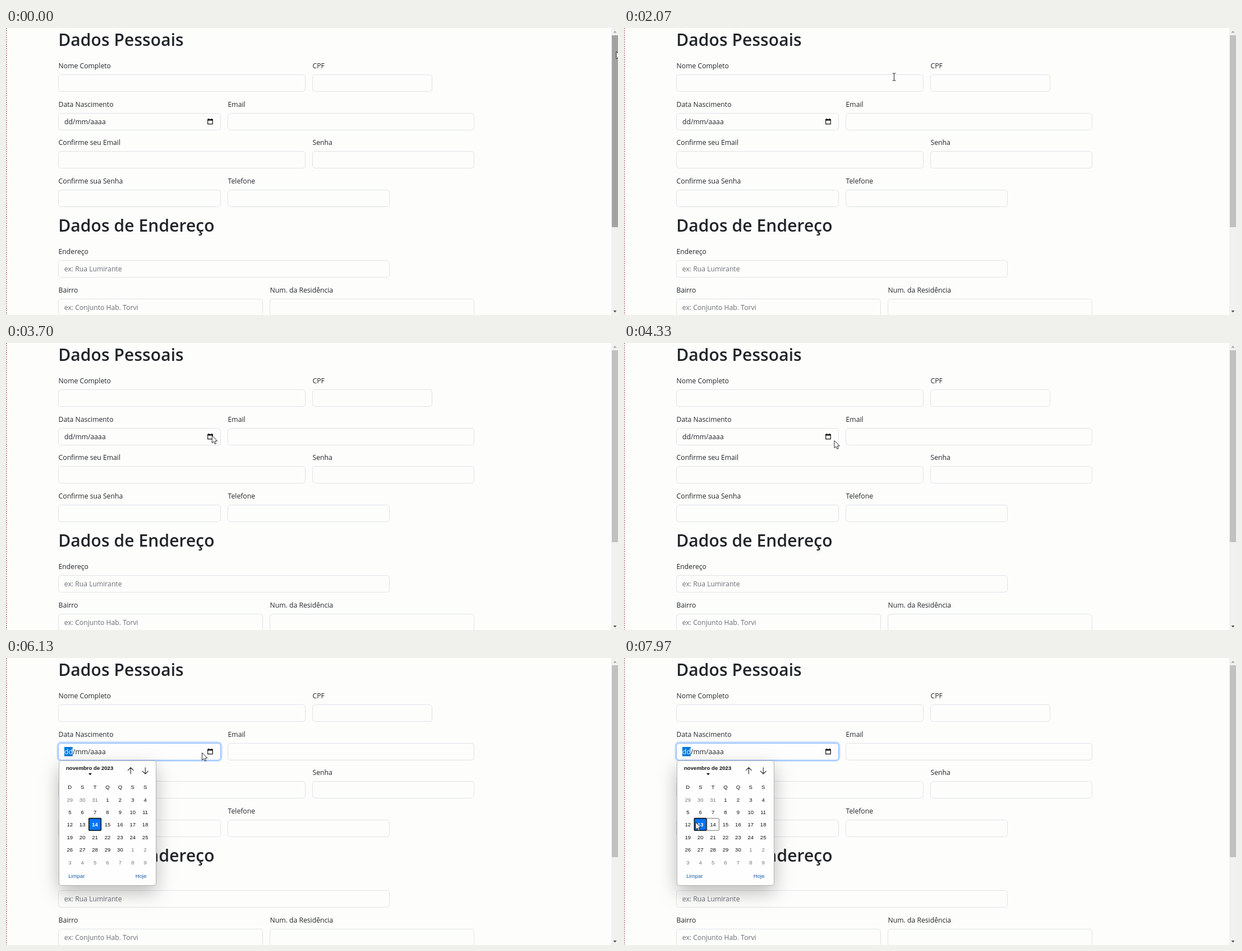
An HTML page for the animation above (8 s loop, 1091x513 px).

```html
<!DOCTYPE html>
<html lang="pt-BR">
<head>
<meta charset="utf-8">
<title>Cadastro</title>
<style>
  html, body { margin: 0; width: 100%; height: 100%; overflow: hidden; background: #fdfdfc; }
  svg { display: block; cursor: default; }
  text { font: 12.2px "Open Sans", "Noto Sans", sans-serif; fill: #212529; white-space: pre; }
  .title { font-size: 30px; font-weight: 600; letter-spacing: .08px; }
  .hint { fill: #6a6f74; }
  .box { fill: #fdfdfc; stroke: #dee2e6; }
  #popup text { font: 9.6px "Liberation Sans", Arial, sans-serif; fill: #111; }
  #popup .mid { text-anchor: middle; }
  #popup .bold { font-weight: bold; }
  #popup .out { fill: #767676; }
  #popup .link { fill: #1a5fa8; }
  #popup .on { fill: #fff; font-weight: bold; }
  #panel { fill: #fefefe; stroke: #b4b4b4; filter: drop-shadow(0 12px 16px rgba(0, 0, 0, .26)); }
</style>
</head>
<body>
<svg id="stage" width="1091" height="513" viewBox="0 0 1091 513">
  <path d="M.9 0V513" stroke="#a05054" stroke-width="1.2" stroke-dasharray="2 2"/>
  <g id="form"></g>
  <g id="focus">
    <rect x="92" y="150.7" width="292" height="33" rx="6.5" fill="none" stroke="#c2dbfe" stroke-width="3"/>
    <rect x="93.5" y="152.5" width="289" height="30" rx="5" fill="#fefefe" stroke="#86b7fe"/>
    <rect x="104" y="159" width="14.8" height="16.5" fill="#0078d7"/>
  </g>
  <text x="104" y="172"><tspan id="day">dd</tspan>/mm/aaaa</text>
  <path d="M359.7 163.4H368.3V171.6H359.7Z" fill="none" stroke="#111" stroke-width="1.2"/>
  <path d="M359.2 163H368.8V165.4H359.2ZM360.8 161.8h1.2v1.5h-1.2zM366 161.8h1.2v1.5h-1.2z" fill="#111"/>
  <rect x="1079" width="12" height="513" fill="#f1f1f1"/>
  <rect id="thumb" x="1080" y="13" width="11" height="343"/>
  <path d="M1082.5 8.5h6l-3 -3.4z" fill="#a3a3a3"/>
  <path d="M1082.5 505h6l-3 3.4z" fill="#505050"/>
  <g id="popup">
    <rect id="panel" x="94.5" y="183.5" width="173" height="223" rx="4.5"/>
    <text class="bold" x="107" y="200">novembro de 2023</text>
    <path d="M147 206h6l-3 3.6z" fill="#111"/>
    <path d="M222.3 207.5V196M217 201.2l5.3 -5.3 5.3 5.3M248.3 195.5V207M243 201.8l5.3 5.3 5.3 -5.3"
          fill="none" stroke="#222" stroke-width="1.1"/>
    <g id="cells"></g>
    <text class="link" x="111.2" y="393">Limpar</text>
    <text class="link" x="230.8" y="393">Hoje</text>
  </g>
  <path id="arrow" d="M0 0V13.2L3 10.4 5 15 7.2 14 5.2 9.6H9.4Z" fill="#fff" stroke="#111" stroke-width=".9"/>
  <path id="beam" d="M-3 -6.5H-.8L0 -5.7 .8 -6.5H3M0 -5.7V5.7M-3 6.5H-.8L0 5.7 .8 6.5H3"
        fill="none" stroke="#333" stroke-width="1.1"/>
</svg>
<script>
const LOOP = 8000, FOCUS = 4800, OPEN = 6020, PICK = 7840;
const $ = id => document.getElementById(id);

function add(parent, tag, attrs, text = '') {
  const el = document.createElementNS('http://www.w3.org/2000/svg', tag);
  for (const key in attrs) el.setAttribute(key, attrs[key]);
  el.textContent = text;
  return parent.appendChild(el);
}

// label, left, right, top, placeholder
const fields = [
  ['Nome Completo', 93, 533, 83], ['CPF', 546, 759, 83],
  ['Data Nascimento', 93, 382, 152], ['Email', 395, 834, 152],
  ['Confirme seu Email', 93, 533, 220], ['Senha', 546, 834, 220],
  ['Confirme sua Senha', 93, 382, 289], ['Telefone', 395, 683, 289],
  ['Endereço', 93, 683, 415, 'ex: Rua Lumirante'],
  ['Bairro', 93, 457, 484, 'ex: Conjunto Hab. Torvi'],
  ['Num. da Residência', 470, 834, 484]
];
const form = $('form');
add(form, 'text', { x: 93.2, y: 32, class: 'title' }, 'Dados Pessoais');
add(form, 'text', { x: 93.2, y: 364, class: 'title' }, 'Dados de Endereço');
for (const [label, x, right, y, hint] of fields) {
  add(form, 'text', { x: x + .6, y: y - 11 }, label);
  add(form, 'rect', { x: x + .5, y: y + .5, width: right - x, height: 30, rx: 5, class: 'box' });
  if (hint) add(form, 'text', { x: x + 10.8, y: y + 20, class: 'hint' }, hint);
}

// Calendar: 42 days beginning on 29 October
const STEP = 22.4, LEFT = 102.6, TOP = 241.8;
[...'DSTQQSS'].forEach((d, i) =>
  add($('cells'), 'text', { x: 113.8 + i * STEP, y: 233.5, class: 'mid' }, d));
const days = Array.from({ length: 42 }, (_, i) => {
  const n = i - 2, col = i % 7, row = Math.floor(i / 7);
  const x = LEFT + col * STEP, y = TOP + row * STEP;
  const box = add($('cells'), 'rect', { x: x + .4, y, width: 21.6, height: 21.6, rx: 1 });
  const date = n < 1 ? n + 31 : n > 30 ? n - 30 : n;
  const label = add($('cells'), 'text', { x: x + 11.2, y: y + 14.7 }, date);
  return { n, x, y, box, label, base: n < 1 || n > 30 ? 'mid out' : 'mid' };
});

function paintDays(t, mx, my) {
  const chosen = t < PICK ? 14 : 13;
  for (const { n, x, y, box, label, base } of days) {
    const on = n === chosen;
    const hover = mx >= x && mx < x + STEP && my >= y && my < y + STEP;
    const [fill, stroke, width] = on ? ['#0075ff', '#101010', 1.6]
      : hover ? ['#b3d4fa', '#3c4a5c', 1]
      : n === 14 ? ['none', '#767676', 1] : ['none', 'none', 0];
    box.setAttribute('fill', fill);
    box.setAttribute('stroke', stroke);
    box.setAttribute('stroke-width', width);
    label.setAttribute('class', on ? 'mid on' : base);
  }
}

// Pointer path: time, x, y
const path = [
  [0, 1088, 42], [150, 1088, 43], [850, 760, 72], [1500, 560, 84], [2070, 481.5, 87.5],
  [2400, 455, 100], [3030, 356.5, 147], [3500, 366, 164], [4330, 375, 174.5],
  [4750, 362, 168], [5470, 354.5, 166], [5900, 358, 166], [6060, 358, 166],
  [6650, 147.8, 249], [6900, 147.8, 249], [7500, 131, 286], [7800, 127.8, 293.5], [LOOP, 127.8, 293.5]
];
function pointer(t) {
  const i = path.findIndex(p => p[0] > t);
  const [t0, x0, y0] = path[i - 1], [t1, x1, y1] = path[i];
  const u = (t - t0) / (t1 - t0), e = u * u * (3 - 2 * u);
  return [x0 + (x1 - x0) * e, y0 + (y1 - y0) * e];
}

function show(el, visible) { el.style.display = visible ? '' : 'none'; }

function draw(now) {
  const t = now % LOOP, [x, y] = pointer(t), open = t >= OPEN;
  const typing = !open && fields.some(([label, l, r, top]) =>
    label !== 'Data Nascimento' && x > l && x < r && y > top && y < top + 30);
  show($('arrow'), !typing);
  show($('beam'), typing);
  $(typing ? 'beam' : 'arrow').setAttribute('transform', `translate(${x} ${y})`);
  $('thumb').setAttribute('fill', x > 1079 ? '#a2a2a2' : '#c1c1c1');
  $('focus').style.opacity = Math.min(1, Math.max(0, (t - FOCUS) / 150));
  $('day').style.fill = t >= FOCUS ? '#fff' : '';
  show($('popup'), open);
  if (open) paintDays(t, x, y);
}

const start = performance.now();
function tick() {
  draw(performance.now() - start);
  requestAnimationFrame(tick);
}
tick();
</script>
</body>
</html>
```
